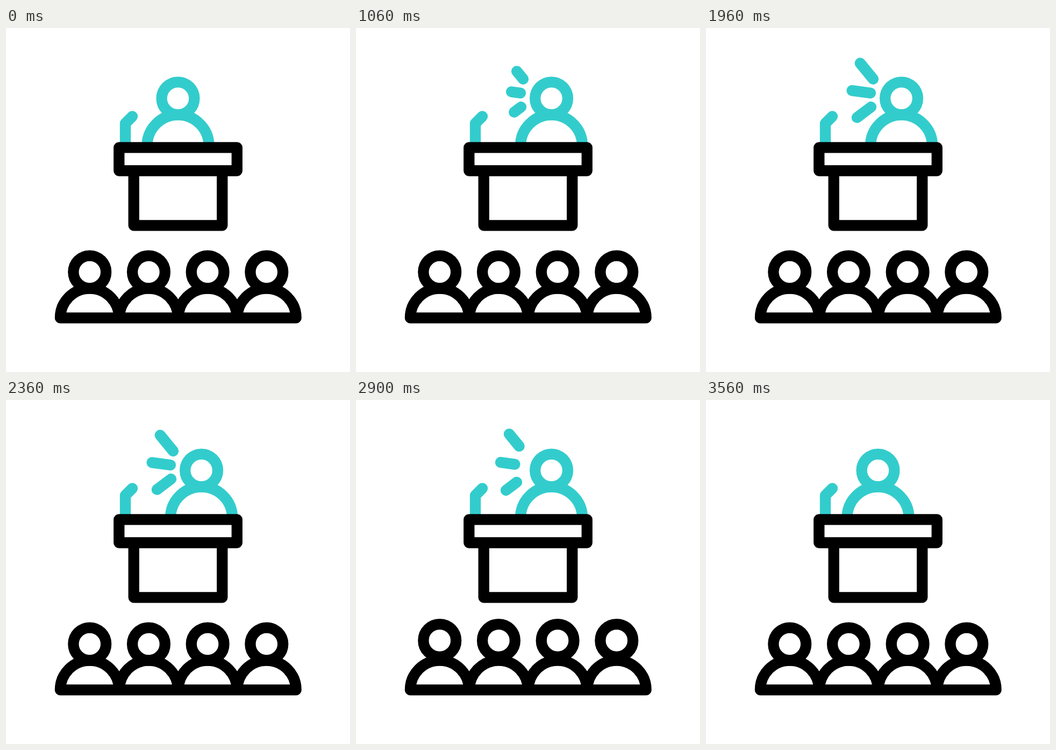
These frames come from a looping animation (640 px wide and 640 px high, 3600 ms). An HTML page:

```html
<!DOCTYPE html>
<html lang="en">
<head>
<meta charset="utf-8">
<title>Speaker and audience</title>
<style>
  html, body { margin: 0; width: 100%; height: 100%; overflow: hidden; background: #fff; }
  svg { display: block; width: 100vw; height: 100vh; }
</style>
</head>
<body>
<svg viewBox="0 0 640 640" fill="none" stroke="#000" stroke-width="20.3" stroke-linecap="round" stroke-linejoin="round">
  <g stroke="#33cccc">
    <path d="M222 215V177.5L235 164.5"/>
    <g id="speaker">
      <path d="M262.5 219a57.5 57.5 0 0 1 115 0"/>
      <circle cx="320" cy="131" r="30.4"/>
    </g>
    <g id="voice"></g>
  </g>
  <path fill="#fff" d="M237.7 265.5V367.3H402.3V265.5M210.3 222.4H429.8V265.5H210.3Z"/>
  <path id="bodies"/>
  <g id="heads"></g>
</svg>
<script>
const TICK = 20, LOOP = 3600;
const SEATS = [0, 1, 2, 3], LEFT = 100.9, SEAT = 109.7, BASE = 539.4;
// Each ray: inner x, y, outer x, y
const RAYS = [[311, 95, 285, 63.3], [306, 121, 269, 116], [307, 147, 279, 168]];

const $ = id => document.getElementById(id);
const add = (parent, tag, attrs) => {
  const el = document.createElementNS("http://www.w3.org/2000/svg", tag);
  for (const name in attrs) el.setAttribute(name, attrs[name]);
  return parent.appendChild(el);
};
const lerp = (a, b, k) => a + (b - a) * k;
const ease = (t, start, end) => {
  const k = Math.min(1, Math.max(0, (t - start) / (end - start)));
  return k * k * (3 - 2 * k);
};
// Eased swing 0 → 1 → 0 over 20 ticks
const swing = t => {
  const p = t % 20;
  return p < 10 ? ease(p, 0, 10) : 1 - ease(p, 10, 20);
};

const radius = SEAT / 2;
$("bodies").setAttribute("d", `M${LEFT} ${BASE}` +
  SEATS.map(() => `a${radius} ${radius} 0 0 1 ${SEAT} 0`).join("") + "Z");
SEATS.forEach(i => add($("heads"), "circle", { cx: LEFT + SEAT * (i + 0.5), cy: 454, r: 30.4 }));
const rays = RAYS.map(() => add($("voice"), "line", {}));

function draw(t) {
  const shift = 43.6 * (ease(t, 0, 20) - ease(t, 158, 178));
  $("speaker").setAttribute("transform", `translate(${shift})`);

  const outer = t < 40 ? ease(t, 20, 40) : t < 140 ? 1 - 0.7 * swing(t - 40) : 1;
  const inner = ease(t, 138, 158);
  $("voice").style.display = outer > inner ? "" : "none";
  RAYS.forEach(([x1, y1, x2, y2], i) => {
    const ends = { x1: lerp(x1, x2, inner), y1: lerp(y1, y2, inner), x2: lerp(x1, x2, outer), y2: lerp(y1, y2, outer) };
    for (const name in ends) rays[i].setAttribute(name, ends[name]);
  });

  const nod = t > 98 && t < 178 ? 8.3 * swing(t - 98) : 0;
  $("heads").setAttribute("transform", `translate(0 ${-nod})`);
}

function frame() {
  draw(performance.now() % LOOP / TICK);
  requestAnimationFrame(frame);
}
frame();
</script>
</body>
</html>
```
